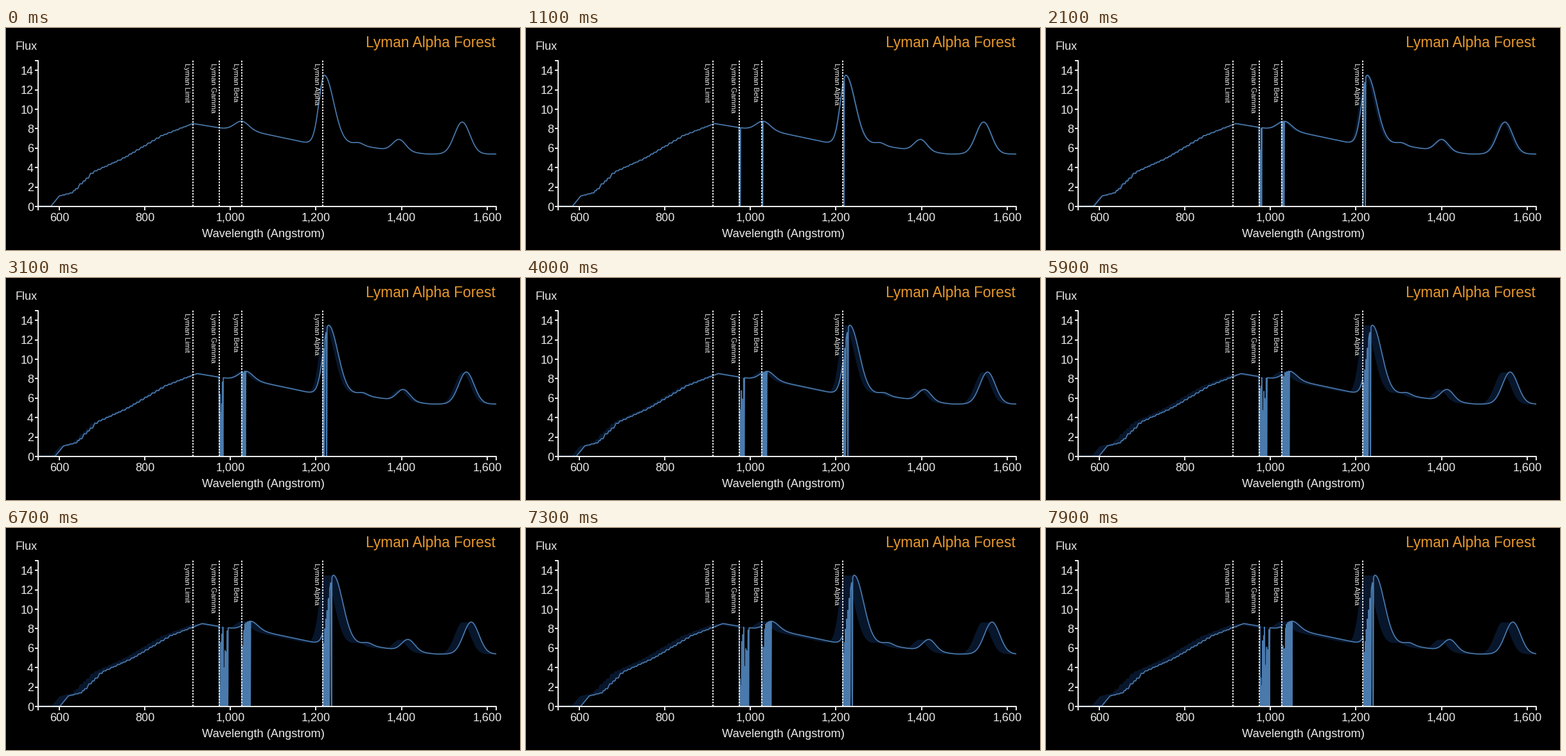
These frames come from a looping animation (800 px wide and 347 px high, 8000 ms). A matplotlib script:

```python
import numpy as np
import matplotlib.pyplot as plt
from matplotlib.animation import FuncAnimation

W, H, DPI = 800, 347, 100
FRAMES, STEP = 80, 100
SPEED = 2.1                  # redshift drift, px per second
LEFT, RIGHT, TOP, ZERO = 50, 763, 51, 279
INK, BLUE, GHOST, GOLD = "#eaeaea", "#4a7aac", "#08162c", "#e8982c"
LINES = {"Limit": 912, "Gamma": 973.5, "Beta": 1026, "Alpha": 1216}

plt.rcParams["font.family"] = "Liberation Sans"
plt.rcParams["toolbar"] = "None"


def pt(px):
    return px * 72 / DPI


def to_x(wave):
    return 83 + (wave - 600) * 0.6658


def to_y(flux):
    return ZERO - flux * 15.2


# Continuum key points in stage pixels; emission peaks are added on top.
KEYS = [(0, 278.5), (70, 278.5), (83, 262.5), (103, 257.5), (136, 225),
        (183, 203.5), (242, 168.5), (291, 149.3), (335, 156.6),
        (390, 162.8), (465, 178.8), (535, 181), (588, 189.5),
        (655, 197), (800, 197)]
# centre, height, left and right width
PEAKS = [(367, 14.5, 11, 11), (495.5, 106, 8.4, 14.5), (549, 4, 7, 7),
         (612, 18, 10, 10), (710, 50, 12, 12)]


def stairs(x):
    """Turn positions into uneven steps: flat, then a short climb."""
    edges = np.cumsum(np.random.default_rng(3).uniform(3, 8, 200))
    k = np.searchsorted(edges, x) - 1
    lo = np.where(k < 0, 0, edges[k])
    size = edges[k + 1] - lo
    return lo + size * np.clip((x - lo) / size * 2.4 - 0.7, 0, 1)


def make_spectrum():
    x = np.arange(0, 800, 0.25)
    kx, ky = np.array(KEYS).T
    y = np.interp(np.where((x > 90) & (x < 280), stairs(x), x), kx, ky)
    smooth = np.convolve(np.pad(y, 20, mode="edge"), np.ones(41) / 41, "valid")
    y = np.where(x > 297, smooth, y)
    for c, h, wl, wr in PEAKS:
        y -= h * np.exp(-0.5 * ((x - c) / np.where(x < c, wl, wr)) ** 2)
    return x, y


def make_clouds():
    """Centre and half width of each absorber, by distance from the first."""
    rng = np.random.default_rng(8)
    alpha = 0.6 + 3.7 * np.arange(8) ** 0.7
    clouds = {"Alpha": (alpha, np.full(8, 0.6))}
    for name in ("Beta", "Gamma"):
        gaps = rng.uniform(1.0, 2.2, 11)
        clouds[name] = (np.cumsum(gaps) - gaps[0] + 0.6,
                        rng.uniform(0.35, 0.75, 11))
    return clouds


SPECTRUM = make_spectrum()
CLOUDS = make_clouds()
X = np.arange(LEFT, RIGHT - 0.5, 0.25)


def emission(shift):
    return np.interp(X - shift, *SPECTRUM)


def transmission(shift):
    t = np.ones_like(X)
    for name, (centres, widths) in CLOUDS.items():
        d = X - to_x(LINES[name])
        active = (d >= 0) & (d <= shift)
        for c, w in zip(centres, widths):
            t *= 1 - active * np.exp(-((shift - d - c) / w) ** 4)
    return t


fig = plt.figure(figsize=(W / DPI, H / DPI), dpi=DPI, facecolor="black")
ax = fig.add_axes([0, 0, 1, 1])
ax.set_xlim(0, W)
ax.set_ylim(H, 0)
ax.axis("off")


def rule(xs, ys, **kw):
    ax.plot(xs, ys, color=INK, lw=pt(2), solid_capstyle="butt",
            dash_capstyle="butt", zorder=4, **kw)


def label(x, y, text, size=18, color=INK, ha="center", va="baseline", **kw):
    ax.text(x, y, text, fontsize=pt(size), color=color, ha=ha, va=va,
            zorder=6, **kw)


rule([LEFT - 5, LEFT, LEFT, LEFT - 5], [TOP, TOP, ZERO, ZERO])
rule([LEFT, LEFT, RIGHT, RIGHT], [ZERO + 6, ZERO, ZERO, ZERO + 6])
for flux in range(0, 15, 2):
    y = to_y(flux)
    rule([LEFT - 5, LEFT], [y, y])
    label(43, y, str(flux), ha="right", va="center_baseline")
for wave in range(600, 1601, 200):
    x = to_x(wave)
    rule([x, x], [ZERO, ZERO + 6])
    label(x, 301.5, f"{wave:,}")
for name, wave in LINES.items():
    x = to_x(wave)
    rule([x, x], [TOP, ZERO], dashes=(1.25, 1))
    label(x - 10, 55, "Lyman " + name, 11.4, va="top", rotation=270)

label(15, 34, "Flux", ha="left")
label(400.5, 327, "Wavelength (Angstrom)", 18.3)
label(762, 30, "Lyman Alpha Forest", 22.8, GOLD, ha="right")

trail = ax.fill_between(X, emission(0), emission(0), color=GHOST, lw=0,
                        zorder=2)
curve, = ax.plot([], [], color=BLUE, lw=pt(1.7), solid_joinstyle="round",
                 zorder=3)


def draw(i):
    shift = SPEED * i * STEP / 1000
    past = np.array([emission(s) for s in np.linspace(0, shift, 24)])
    lo, hi = past.min(axis=0), past.max(axis=0)
    trail.set_verts([np.column_stack([np.r_[X, X[::-1]],
                                      np.r_[lo, hi[::-1]]])])
    floor = ZERO - 0.5
    curve.set_data(X, floor - (floor - past[-1]) * transmission(shift))
    return trail, curve


anim = FuncAnimation(fig, draw, frames=FRAMES, interval=STEP, repeat=True,
                     repeat_delay=0, blit=False)
plt.show()
```
